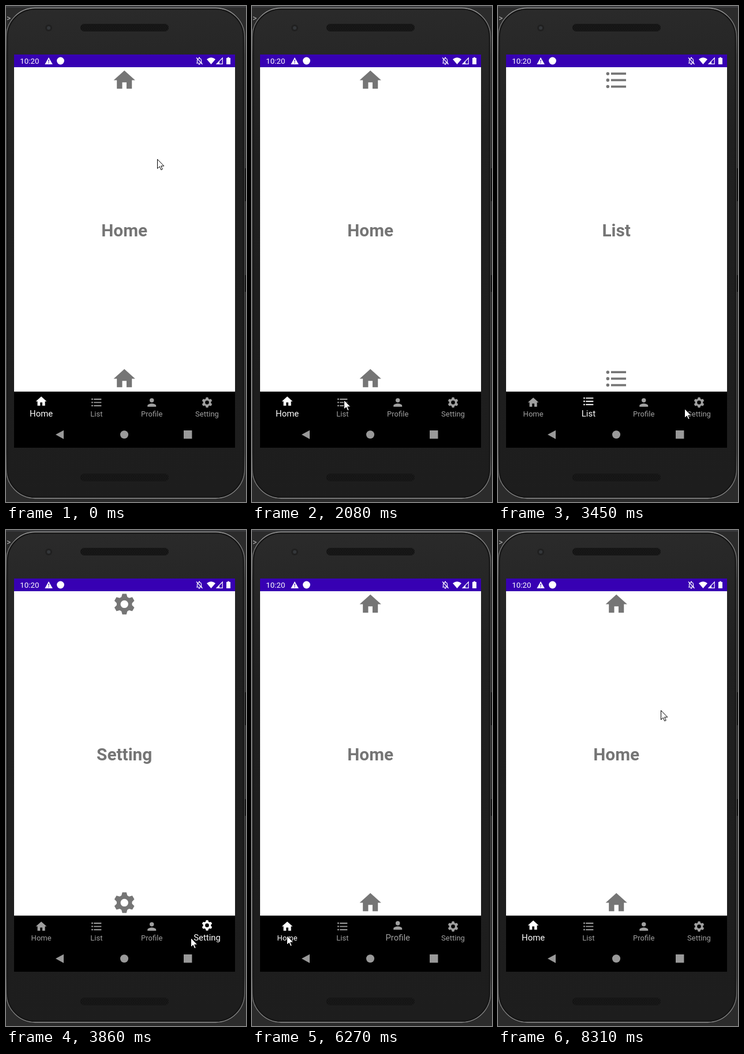
An HTML page with a canvas for the animation above (9.17 s loop, 416 by 859 pixels).

```html
<!DOCTYPE html>
<html lang="en">
<head>
<meta charset="utf-8">
<title>Bottom navigation</title>
<style>
html, body { margin: 0; width: 100%; height: 100%; overflow: hidden; background: #2b2b2b; }
canvas { display: block; width: 416px; height: 859px; }
</style>
</head>
<body>
<canvas id="stage" width="416" height="859"></canvas>
<script>
const W = 416, H = 859, LOOP = 9170, STEP = 69;
const MID = 205.2, TAB = 95.8;
const FONT = 'Roboto, "Noto Sans", sans-serif';
const GREY = '#757575', IDLE = '#a0a0a0', BAR = '#3700b3';
const ctx = document.getElementById('stage').getContext('2d');

function dot(g, x, y, r, color) {
  g.fillStyle = color;
  g.beginPath();
  g.arc(x, y, r, 0, 7);
  g.fill();
}

function shape(g, path, color) {
  g.fillStyle = color;
  g.fill(new Path2D(path));
}

function box(g, x, y, w, h, color) {
  g.fillStyle = color;
  g.fillRect(x, y, w, h);
}

function label(g, str, x, y, size, color, weight = 400, align = 'center') {
  g.font = `${weight} ${size}px ${FONT}`;
  g.textAlign = align;
  g.fillStyle = color;
  g.fillText(str, x, y);
}

// Icons live on a 24 x 24 grid.
function gearIcon() {
  const p = new Path2D();
  for (let i = 0; i < 6; i++) {
    for (const [a, r] of [[-0.392, 7.2], [-0.197, 9.8], [0.197, 9.8], [0.392, 7.2]]) {
      const q = a + i * Math.PI / 3;
      p.lineTo(12 + r * Math.sin(q), 12 - r * Math.cos(q));
    }
  }
  p.closePath();
  p.moveTo(15.6, 12);
  p.arc(12, 12, 3.6, 0, 2 * Math.PI);
  return p;
}

function listIcon() {
  const p = new Path2D();
  for (const y of [6, 12, 18]) {
    p.moveTo(5.5, y);
    p.arc(4, y, 1.5, 0, 2 * Math.PI);
    p.rect(7, y - 1, 14, 2);
  }
  return p;
}

function personIcon() {
  const p = new Path2D('M12 14c-2.67 0-8 1.34-8 4v2h16v-2c0-2.66-5.33-4-8-4z');
  p.moveTo(16, 8);
  p.arc(12, 8, 4, 0, 2 * Math.PI);
  return p;
}

const tabs = [
  { name: 'Home', icon: new Path2D('M10 20v-6h4v6h5v-8h3L12 3 2 12h3v8z') },
  { name: 'List', icon: listIcon() },
  { name: 'Profile', icon: personIcon() },
  { name: 'Setting', icon: gearIcon() }
];

function drawIcon(icon, x, y, size, color) {
  ctx.save();
  ctx.translate(x - size / 2, y - size / 2);
  ctx.scale(size / 24, size / 24);
  ctx.fillStyle = color;
  ctx.fill(icon, 'evenodd');
  ctx.restore();
}

function speaker(g, y) {
  const x = 129, w = 153, h = 13;
  g.save();
  g.beginPath();
  g.roundRect(x, y, w, h, h / 2);
  g.clip();
  box(g, x, y, w, h, '#121212');
  for (let j = 0; j * 2.5 < h; j++) {
    for (let i = 0; i * 3 < w; i++) {
      dot(g, x + 2 + i * 3 + (j % 2) * 1.5, y + 1.5 + j * 2.5, 0.7, '#282828');
    }
  }
  g.restore();
}

function statusBar(g) {
  box(g, 14, 84, 383, 22, BAR);
  label(g, '10:20', 24.3, 100, 13.3, '#fff', 400, 'left');
  shape(g, 'M74 89L80.8 101H67.4z', '#fff');
  shape(g, 'M73.4 93h1.3v3.6h-1.3zM73.4 97.8h1.3v1.4h-1.3z', BAR);
  dot(g, 94.5, 95, 6.4, '#fff');

  // muted bell
  g.strokeStyle = '#fff';
  g.lineWidth = 1.2;
  g.stroke(new Path2D('M331.5 99v-4.5c0-5 7-5 7 0V99zM330 99h10M330 89.5l10.5 11.5'));
  shape(g, 'M334 88.7h2v2h-2zM333.6 100h2.8v1.4h-2.8z', '#fff');

  // wifi, signal, battery
  shape(g, 'M348 92.3Q355.5 86.2 363 92.3L355.5 101z', '#fff');
  g.stroke(new Path2D('M375.2 90v10.4H365.2z'));
  shape(g, 'M370 95.5V101H364.5z', '#fff');
  shape(g, 'M382 90h2v-1.3h3V90h2v11h-7z', '#fff');
}

function vertical(g, edge, near, middle) {
  const fade = g.createLinearGradient(0, 0, 0, H);
  [edge, near, middle, middle, near, edge].forEach((c, i) => {
    fade.addColorStop(i < 3 ? i * 0.05 : 1 - (5 - i) * 0.05, c);
  });
  return fade;
}

function phone(g) {
  box(g, 0, 0, W, H, '#2b2b2b');
  box(g, 0, 0, W, 3, '#38393b');
  label(g, '>', 1, 26, 14, '#b0b0b0', 400, 'left');

  // side buttons, body, rim
  box(g, 413, 281, 3, 57, '#0c0c0c');
  box(g, 413, 466, 3, 29, '#0c0c0c');
  const shade = g.createLinearGradient(0, 0, 70, H);
  shade.addColorStop(0, '#2b2b2b');
  shade.addColorStop(0.3, '#202020');
  shade.addColorStop(1, '#1d1d1d');
  g.beginPath();
  g.roundRect(0.5, 3.5, 413, 849, 50);
  g.fillStyle = shade;
  g.fill();
  g.strokeStyle = vertical(g, '#a0a0a0', '#787878', '#4c4c4c');
  g.lineWidth = 1.3;
  g.stroke();
  g.beginPath();
  g.roundRect(2.5, 5.5, 409, 845, 48);
  g.strokeStyle = '#161616';
  g.lineWidth = 2;
  g.stroke();

  dot(g, 74, 38, 6, '#202020');
  dot(g, 74, 38, 3, '#34373a');
  speaker(g, 31);
  speaker(g, 810);

  box(g, 14, 106, 383, 562, '#fff');
  box(g, 14, 667, 383, 1, '#d0d0d0');
  box(g, 14, 668, 383, 97, '#000');
  statusBar(g);
  shape(g, 'M86 742.3L100 734.7V750z', '#999');
  dot(g, 205, 742.3, 7, '#999');
  box(g, 308, 735, 14.4, 14.4, '#999');
}

const backdrop = document.createElement('canvas');
backdrop.width = W;
backdrop.height = H;
phone(backdrop.getContext('2d'));

// Pointer moves: start and end in ms, where to, sideways bow of the path.
const moves = [
  { from: 0, to: 0, x: 262, y: 265, bow: 0 },
  { from: 380, to: 450, x: 257, y: 277, bow: 0 },
  { from: 710, to: 990, x: 233, y: 462, bow: 0 },
  { from: 1320, to: 2150, x: 159, y: 687, bow: 30 },
  { from: 2750, to: 3590, x: 336, y: 699, bow: -6 },
  { from: 3720, to: 3860, x: 320, y: 706, bow: 0 },
  { from: 3860, to: 4480, x: 250, y: 683, bow: -6 },
  { from: 4750, to: 4890, x: 262, y: 688, bow: 0 },
  { from: 4890, to: 5080, x: 259, y: 693, bow: 0 },
  { from: 5080, to: 5780, x: 75, y: 701, bow: -4 },
  { from: 5850, to: 6120, x: 60, y: 702, bow: 8 },
  { from: 6270, to: 6970, x: 221, y: 716, bow: 4 },
  { from: 7240, to: 7840, x: 342, y: 321, bow: 25 },
  { from: 8100, to: 8310, x: 282, y: 312, bow: 0 }
];

// Taps: time and the tab that opens.
const taps = [
  { from: -1000, tab: 0 },
  { from: 2280, tab: 1 },
  { from: 3720, tab: 3 },
  { from: 4890, tab: 2 },
  { from: 6270, tab: 0 }
];

const current = (list, t) => list.findLastIndex(e => e.from <= t);

function pointerAt(t) {
  const i = current(moves, t);
  const b = moves[i], a = moves[Math.max(i - 1, 0)];
  const n = Math.round((b.to - b.from) / STEP);
  const k = Math.floor((t - b.from) / (b.to - b.from) * n + 0.05);
  const p = n && k < n ? k / n : 1;
  const e = p * p * (3 - 2 * p);
  const dx = b.x - a.x, dy = b.y - a.y;
  const side = b.bow * Math.sin(Math.PI * e) / (Math.hypot(dx, dy) || 1);
  return [a.x + dx * e - dy * side, a.y + dy * e + dx * side];
}

const arrow = new Path2D('M0 0V16L3.7 12.5 6.3 18.3 8.7 17.2 6.2 11.6H11.3z');

function pointer([x, y]) {
  ctx.save();
  ctx.translate(Math.round(x) + 0.5, Math.round(y) + 0.5);
  ctx.fillStyle = '#fff';
  ctx.fill(arrow);
  ctx.strokeStyle = '#000';
  ctx.lineWidth = 1;
  ctx.stroke(arrow);
  ctx.restore();
}

function draw(t) {
  ctx.drawImage(backdrop, 0, 0);

  const now = current(taps, t);
  const open = taps[now].tab;
  const prev = now ? taps[now - 1].tab : -1;
  const grow = Math.min(1, Math.floor((t - taps[now].from) / STEP + 0.05) / 2);

  const page = tabs[open];
  drawIcon(page.icon, MID, 128.4, 44.7, GREY);
  drawIcon(page.icon, MID, 645.4, 44.7, GREY);
  label(ctx, page.name, MID, 398.7, 29.8, GREY, 700);

  tabs.forEach((tab, i) => {
    const s = i === open ? grow : i === prev ? 1 - grow : 0;
    const color = i === open ? '#fff' : IDLE;
    const x = 61.1 + i * TAB;
    drawIcon(tab.icon, x, 686.6 - 1.9 * s, 22.4, color);
    label(ctx, tab.name, x, 710.8, 13 + 1.9 * s, color);
  });

  pointer(pointerAt(t));
}

const start = performance.now();
function tick() {
  draw((performance.now() - start) % LOOP);
  requestAnimationFrame(tick);
}
tick();
</script>
</body>
</html>
```
